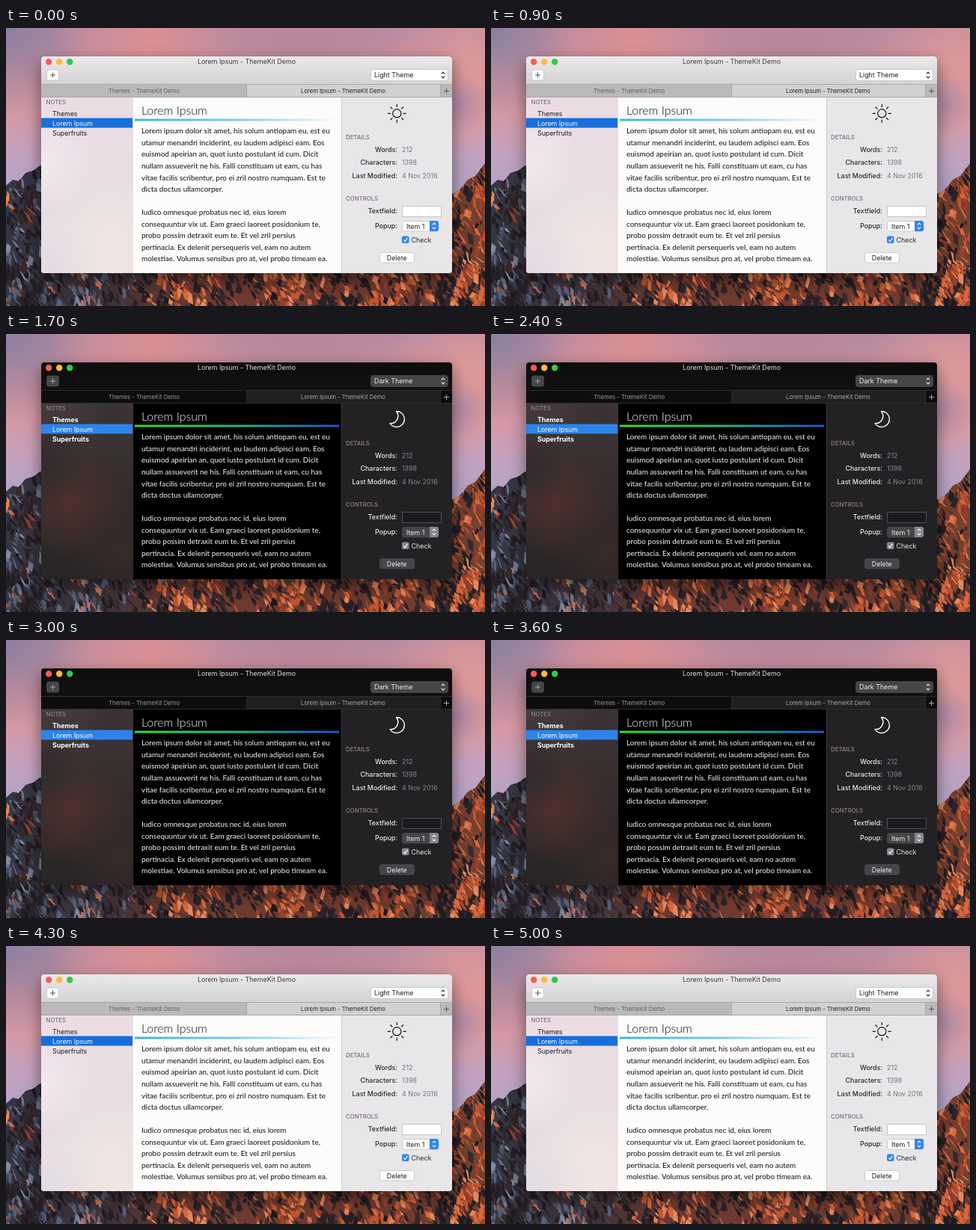
Write an HTML page with a canvas that moves like this. It is 640 by 372 pixels and loops after 5100 ms.

```html
<!DOCTYPE html>
<html lang="en">
<head>
<meta charset="utf-8">
<title>Theme switch</title>
<style>
html, body { margin: 0; width: 100%; height: 100%; overflow: hidden; }
canvas { display: block; }
</style>
</head>
<body>
<canvas id="stage" width="640" height="372"></canvas>
<script>
const W = 640, H = 372, LOOP = 5100;
const UI = 'Inter, sans-serif', HUMANIST = 'Lato, sans-serif';
const view = document.getElementById('stage').getContext('2d');

const light = {
  barTop: '#ebe9eb', barBottom: '#d3d1d3', title: '#3c3c3c',
  tab: '#bab8ba', tabOn: '#d2d0d2', tabText: '#626162', tabOnText: '#262626', line: '#a9a7a9',
  button: '#fdfdfd', buttonEdge: '#c3c1c3', buttonText: '#222', plus: '#555',
  side: ['#ecdde5', '#eadde3', '#e6dde2', '#eee4e4'],
  glows: [[48, 180, 70, '#f1e9ee'], [140, 290, 90, '#f2e6e3'], [60, 320, 70, '#e2dce3']],
  heading: '#747076', item: '#1c1a1c', itemWeight: 400, selection: '#176fd9',
  page: '#fdfcfb', ink: '#111', rule: ['#43b4dc', '#7fcbe6', '#fdfcfb'],
  panel: '#e8e6e9', split: '#cbc9cc', label: '#2c2a2d', value: '#79767b',
  field: '#ffffff', fieldEdge: '#c6c4c8', cap: '#2f85ec', check: '#2f85ec',
  name: 'Light Theme', icon: '#111'
};
const dark = {
  barTop: '#0d0d0e', barBottom: '#111112', title: '#dededf',
  tab: '#0d0d0e', tabOn: '#202021', tabText: '#98979a', tabOnText: '#a9a8ab', line: '#2c2c2e',
  button: '#464548', buttonEdge: '#4c4b4e', buttonText: '#ececed', plus: '#a5a4a7',
  side: ['#443a3d', '#36302f', '#2f2a2b', '#272425'],
  glows: [[85, 225, 75, '#4f302a'], [145, 110, 60, '#383032'], [155, 290, 70, '#382a28'], [52, 180, 50, '#312b2d']],
  heading: '#8b858a', item: '#ffffff', itemWeight: 700, selection: '#2c84e8',
  page: '#000000', ink: '#f6f6f6', rule: ['#32df32', '#20b980', '#2450cd'],
  panel: '#232124', split: '#3b393c', label: '#e9e8ea', value: '#88858a',
  field: '#1c1a1d', fieldEdge: '#504e52', cap: '#88868b', check: '#88868b',
  name: 'Dark Theme', icon: '#fff'
};
const body = [
  'Lorem ipsum dolor sit amet, his solum antiopam eu, est eu',
  'utamur menandri inciderint, eu laudem adipisci eam. Eos',
  'euismod apeirian an, quot iusto postulant id cum. Dicit',
  'nullam assueverit ne his. Falli constituam ut eam, cu has',
  'vitae facilis scribentur, pro ei zril nostro numquam. Est te',
  'dicta doctus ullamcorper.',
  '',
  'Iudico omnesque probatus nec id, eius lorem',
  'consequuntur vix ut. Eam graeci laoreet posidonium te,',
  'probo possim detraxit eum te. Et vel zril persius',
  'pertinacia. Ex delenit persequeris vel, eam no autem',
  'molestiae. Volumus sensibus pro at, vel probo timeam ea.'
];

function layer(draw) {
  const c = document.createElement('canvas');
  c.width = W; c.height = H;
  draw(c.getContext('2d'));
  return c;
}

function gradient(g, x0, y0, x1, y1, colors) {
  const fill = g.createLinearGradient(x0, y0, x1, y1);
  colors.forEach((c, i) => fill.addColorStop(i / (colors.length - 1), c));
  return fill;
}

function rect(g, x, y, w, h, fill) {
  g.fillStyle = fill;
  g.fillRect(x, y, w, h);
}

function box(g, x, y, w, h, r, fill, edge) {
  g.beginPath();
  g.roundRect(x, y, w, h, r);
  g.fillStyle = fill;
  g.fill();
  if (!edge) return;
  g.strokeStyle = edge;
  g.lineWidth = 0.8;
  g.stroke();
}

function glow(g, x, y, r, color) {
  const fill = g.createRadialGradient(x, y, 0, x, y, r);
  fill.addColorStop(0, color);
  fill.addColorStop(1, color + '00');
  rect(g, x - r, y - r, 2 * r, 2 * r, fill);
}

function poly(g, points, fill) {
  g.beginPath();
  points.forEach(([x, y]) => g.lineTo(x, y));
  g.closePath();
  g.fillStyle = fill;
  g.fill();
}

function stroke(g, points, color, width = 1) {
  g.beginPath();
  points.forEach(([x, y], i) => i ? g.lineTo(x, y) : g.moveTo(x, y));
  g.strokeStyle = color;
  g.lineWidth = width;
  g.stroke();
}

function text(g, str, x, y, color, size = 8.9, weight = 400, align = 'left', family = UI) {
  g.font = `${weight} ${size}px ${family}`;
  g.textAlign = align;
  g.fillStyle = color;
  g.fillText(str, x, y);
}

function plus(g, x, y, r, color) {
  stroke(g, [[x - r, y], [x + r, y]], color);
  stroke(g, [[x, y - r], [x, y + r]], color);
}

function chevrons(g, x, y, color) {
  for (const s of [-1, 1]) {
    stroke(g, [[x - 2.2, y + s * 1.6], [x, y + s * 3.9], [x + 2.2, y + s * 1.6]], color, 1.1);
  }
}

function seeded(seed) {
  return () => (seed = seed * 16807 % 2147483647) / 2147483647;
}

// Small steep facets; a smooth field decides which of them catch the sun.
function drawRocks(g) {
  const shade = ['#1d191f', '#2a2228', '#35282c', '#241e25'];
  const snow = ['#6d7790', '#566078', '#8489a0', '#464c61'];
  const sunlit = ['#d9683f', '#c2552f', '#e6875a', '#963f2c'];
  const rnd = seeded(77);
  for (let i = 0; i < 1300; i++) {
    const side = rnd() < 0.35;
    const x = side ? (rnd() < 0.5 ? rnd() * 60 : 585 + rnd() * 60) : rnd() * W;
    const y = side ? 175 + rnd() * 190 : 312 + rnd() * 65;
    const lit = 0.6 * Math.cos((x - 235) * 0.0465) + 0.7 * Math.sin(x * 0.17 + y * 0.09) + rnd() - 0.4;
    const warmth = x < 70 ? (y < 255 ? 0.4 : 0.05) : (x - 70) / 150;
    const colors = lit < 0.15 ? shade : rnd() < warmth ? sunlit : snow;
    const w = 2 + rnd() * 5, h = 6 + rnd() * 14, lean = (rnd() - 0.35) * 14;
    poly(g, [[x, y], [x + w, y + h * 0.3], [x + lean + w, y + h], [x + lean, y + h * 0.8]],
      colors[Math.floor(rnd() * colors.length)]);
  }
}

function drawScenery(g) {
  rect(g, 0, 0, W, H, gradient(g, 0, 0, 0, 230, ['#b58ba3', '#d0909b', '#d499a5', '#c2a2bf', '#aca4c8']));
  glow(g, 0, 0, 120, '#8c809f');
  glow(g, 190, 22, 130, '#dc9194');
  glow(g, 400, 5, 130, '#b9869b');
  glow(g, 615, 50, 110, '#dd9999');
  glow(g, 605, 102, 40, '#b08aa6');

  g.save();
  const ridge = [[0, 211], [9, 203], [17, 205], [26, 194], [36, 191], [46, 184], [90, 215], [560, 240],
    [596, 222], [606, 217], [617, 203], [627, 198], [640, 181], [W, H], [0, H]];
  poly(g, ridge, gradient(g, 0, 0, W, 0, ['#343643', '#3b3138', '#6d3a30', '#6f3a2e', '#6d392d', '#74402f']));
  g.clip();
  drawRocks(g);
  g.restore();

  g.shadowColor = 'rgba(0,0,0,.5)';
  g.shadowBlur = 22;
  g.shadowOffsetY = 8;
  box(g, 47, 38, 549, 290, 4, '#555');
}

function drawToolbar(g, t) {
  rect(g, 47, 38, 549, 38, gradient(g, 0, 38, 0, 76, [t.barTop, t.barBottom]));
  ['#fb5b54', '#fcbc39', '#34c84a'].forEach((color, i) => box(g, 53 + 14 * i, 41, 8.4, 8.4, 4.2, color));
  text(g, 'Lorem Ipsum - ThemeKit Demo', 321.5, 48.4, t.title, 8.9, 400, 'center');
  box(g, 54.5, 56, 16, 14, 2.5, t.button, t.buttonEdge);
  plus(g, 62.5, 63, 3.5, t.plus);
  box(g, 487.5, 55.5, 103, 15, 3, t.button, t.buttonEdge);
  text(g, t.name, 492, 66.3, t.buttonText);
  chevrons(g, 584, 63, t.buttonText);

  rect(g, 47, 76, 274, 16, t.tab);
  rect(g, 321, 76, 275, 16, t.tabOn);
  rect(g, 580, 76, 16, 16, t.tab);
  for (const y of [75, 92]) rect(g, 47, y, 549, 1, t.line);
  for (const x of [321, 580]) rect(g, x, 76, 1, 16, t.line);
  text(g, 'Themes - ThemeKit Demo', 184.5, 87, t.tabText, 7.65, 400, 'center');
  text(g, 'Lorem Ipsum - ThemeKit Demo', 450.5, 87, t.tabOnText, 7.65, 400, 'center');
  plus(g, 588.5, 84.5, 3.5, t.plus);
}

function drawSidebar(g, t) {
  g.save();
  g.beginPath();
  g.rect(47, 93, 123, 235);
  g.clip();
  rect(g, 47, 93, 123, 235, gradient(g, 0, 93, 0, 328, t.side));
  t.glows.forEach(args => glow(g, ...args));
  g.restore();
  rect(g, 47, 120.5, 122, 13, t.selection);
  text(g, 'NOTES', 53.5, 102.3, t.heading, 7.8, 500);
  text(g, 'Themes', 62, 117.5, t.item, 8.8, t.itemWeight);
  text(g, 'Lorem Ipsum', 62, 130.7, '#fff', 8.8);
  text(g, 'Superfruits', 62, 143.7, t.item, 8.8, t.itemWeight);
}

function drawEditor(g, t) {
  rect(g, 170, 93, 278, 235, t.page);
  text(g, 'Lorem Ipsum', 181, 115.5, t.ink, 15.9, 300, 'left', HUMANIST);
  rect(g, 172, 121.5, 273, 3, gradient(g, 172, 0, 445, 0, t.rule));
  body.forEach((line, i) =>
    text(g, line, 181, 141.3 + i * 15.55, t.ink, 9.95, 400, 'left', HUMANIST));
}

function drawSun(g, color) {
  g.beginPath();
  g.arc(522.3, 114.3, 5.6, 0, 2 * Math.PI);
  g.strokeStyle = color;
  g.lineWidth = 1.2;
  g.stroke();
  for (let i = 0; i < 8; i++) {
    const a = i * Math.PI / 4;
    stroke(g, [8.4, 12.4].map(r => [522.3 + r * Math.cos(a), 114.3 + r * Math.sin(a)]), color, 1.2);
  }
}

function drawMoon(g, color) {
  g.strokeStyle = color;
  g.lineWidth = 1.35;
  g.lineJoin = 'round';
  g.stroke(new Path2D('M521.5 103.5A10.5 10.5 0 1 1 513 119.5A9.8 9.8 0 0 0 521.5 103.5Z'));
}

function drawInspector(g, t) {
  rect(g, 448, 93, 148, 235, t.panel);
  rect(g, 448, 93, 1, 235, t.split);
  (t === light ? drawSun : drawMoon)(g, t.icon);

  text(g, 'DETAILS', 454, 148.8, t.heading, 7.8, 500);
  text(g, 'CONTROLS', 454, 231.3, t.heading, 7.8, 500);
  const rows = [['Words:', 166, '212'], ['Characters:', 183.4, '1398'],
    ['Last Modified:', 200.7, '4 Nov 2016'], ['Textfield:', 248.2], ['Popup:', 268.3]];
  for (const [label, y, value] of rows) {
    text(g, label, 523, y, t.label, 8.9, 500, 'right');
    if (value) text(g, value, 529, y, t.value);
  }

  g.strokeStyle = t.fieldEdge;
  g.lineWidth = 1;
  rect(g, 529, 238, 53, 14, t.field);
  g.strokeRect(529.5, 238.5, 52, 14);

  box(g, 529.5, 258.5, 48.5, 13.5, 3, t.button, t.buttonEdge);
  box(g, 566, 258, 12, 14, [0, 3, 3, 0], t.cap);
  text(g, 'Item 1', 535, 268.5, t.buttonText);
  chevrons(g, 572, 265, '#fff');

  box(g, 529, 278.5, 9.5, 9.5, 2, t.check);
  stroke(g, [[531.3, 283.5], [533.1, 285.8], [536.4, 280.8]], '#fff', 1.2);
  text(g, 'Check', 541.5, 286.5, t.label);

  box(g, 499.5, 300.5, 46, 13.5, 3, t.button, t.buttonEdge);
  text(g, 'Delete', 522.3, 310.5, t.buttonText, 8.9, 400, 'center');
}

function drawWindow(g, t) {
  g.beginPath();
  g.roundRect(47, 38, 549, 290, 4);
  g.clip();
  drawToolbar(g, t);
  drawSidebar(g, t);
  drawEditor(g, t);
  drawInspector(g, t);
}

// The translucent sidebar turns neutral and its selection pales while fading.
function drawVeil(g) {
  rect(g, 47, 93, 123, 235, '#5c5c5c90');
  rect(g, 47, 120.5, 122, 13, '#8bb4dd');
  text(g, 'Themes', 62, 117.5, '#e4e4e4', 8.8, 500);
  text(g, 'Lorem Ipsum', 62, 130.7, '#fff', 8.8);
  text(g, 'Superfruits', 62, 143.7, '#e4e4e4', 8.8, 500);
}

const scenery = layer(drawScenery);
const lightWindow = layer(g => drawWindow(g, light));
const darkWindow = layer(g => drawWindow(g, dark));
const veil = layer(drawVeil);

const ramp = (time, start) => Math.min(1, Math.max(0, (time - start) / 500));

function blend(image, alpha) {
  view.globalAlpha = alpha;
  view.drawImage(image, 0, 0);
}

function render(now) {
  const time = Math.floor(now % LOOP / 100) * 100;
  const darkness = ramp(time, 1200) - ramp(time, 3800);
  blend(scenery, 1);
  blend(lightWindow, 1);
  blend(darkWindow, darkness);
  blend(veil, 4 * darkness * (1 - darkness));
}

const start = performance.now();
function tick() {
  render(performance.now() - start);
  requestAnimationFrame(tick);
}
tick();
</script>
</body>
</html>
```
